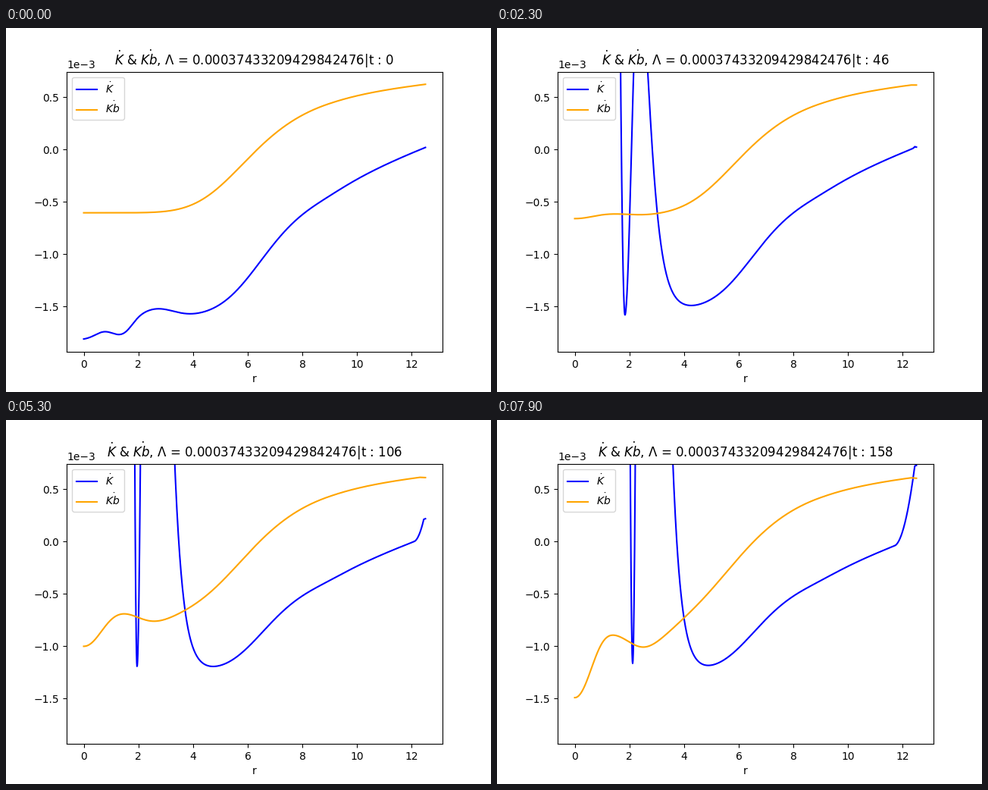
A matplotlib script that plays this animation: 640x480 px, repeating every 8 s.

```python
import numpy as np
import matplotlib.pyplot as plt
from matplotlib.animation import FuncAnimation

FRAMES, INTERVAL, STEP = 80, 100, 2
LAMBDA = "0.00037433209429842476"
EDGE = 12.44

r = np.linspace(0, 12.5, 1251)


def rise(center, power, bend):
    """Step from 0 to 1 with a long upper tail."""
    x = r**power
    return (x / (x + center**power))**bend


def gauss(center, width):
    return np.exp(-((r - center) / width)**2)


def bump(center):
    """Skewed hump of height 1 with power-law flanks."""
    x = (r / center)**3
    return 2 * x / (1 + x**2)


def ramp(start, end):
    return np.clip((r - start) / (end - start), 0, 1)


# Initial profiles, in units of 1e-3
core = -.217 / (1 + np.exp((r - 1.74) / .19)) + .075 * gauss(.77, .5)
outer = .096 * .35 * np.log1p(np.exp((r - 8.85) / .35))
K0 = -1.6 + core + .079 * gauss(2.7, .87) + 1.29 * rise(6.55, 6.7, 1.2) + outer
Kb0 = -.604 + 1.23 * rise(5.85, 4.8, 1.375) + .0062 * np.maximum(r - 9, 0)**1.5


def k_dot(T):
    drift = .245 * np.sin(np.pi * T / 2.62)**3 * 2 / (1 + (r / 6)**4)

    # Two instability walls around a dip, the right one folding into a decaying tail
    u = r - (1.815 + .122 * T**2)
    wall = (215 - 78 * T) * np.maximum(u, 1e-6)**2
    tail = (1.55 + .47 * T) * np.exp(-3.5 * (r - 3.3))
    right = (wall**-.6 + tail**-.6)**(-1 / .6)
    steep = T**2 * np.where(u < 0, (560 - 290 * T) * u**2, right)

    # Disturbance running inwards from the outer boundary
    edge = .145 * T**3.4 * ramp(12.4 - .28 * T**2, EDGE)**2
    hook = .02 * min(1, 4 * T) * max(0, 1 - T) * ramp(EDGE, 12.5)
    return np.minimum(K0 + drift + steep + edge - hook, 6)


def kb_dot(T):
    growth = T**2 * (.31 - .06 * np.cos(np.pi * (T - .23) / 1.1))
    late = .125 * (T / 1.58)**6
    sink = np.exp(-(r / .93)**2.1) + .405 * bump(2.65) + late * bump(1.6)
    drop = min(1, 4 * T) * (.005 + .004 * T) * ramp(12.3, 12.5)
    return Kb0 - growth * sink - drop


fig, ax = plt.subplots(figsize=(6.4, 4.8), dpi=100)
k_line, = ax.plot(r, K0 * 1e-3, color="blue", label=r"$\dot{K}$")
kb_line, = ax.plot(r, Kb0 * 1e-3, color="orange", label=r"$\dot{Kb}$")
ax.set_xlim(-.625, 13.125)
ax.set_ylim(-1.9337e-3, .7442e-3)
ax.set_xlabel("r")
ax.ticklabel_format(axis="y", style="sci", scilimits=(0, 0))
ax.legend(loc="upper left")
title = ax.set_title("")


def update(i):
    t = STEP * i
    k_line.set_ydata(k_dot(t / 100) * 1e-3)
    kb_line.set_ydata(kb_dot(t / 100) * 1e-3)
    title.set_text(rf"$\dot{{K}}$ & $\dot{{Kb}}$, $\Lambda$ = {LAMBDA}|t : {t}")
    return k_line, kb_line, title


anim = FuncAnimation(fig, update, frames=FRAMES, interval=INTERVAL,
                     repeat=True, repeat_delay=0)
plt.show()
```
